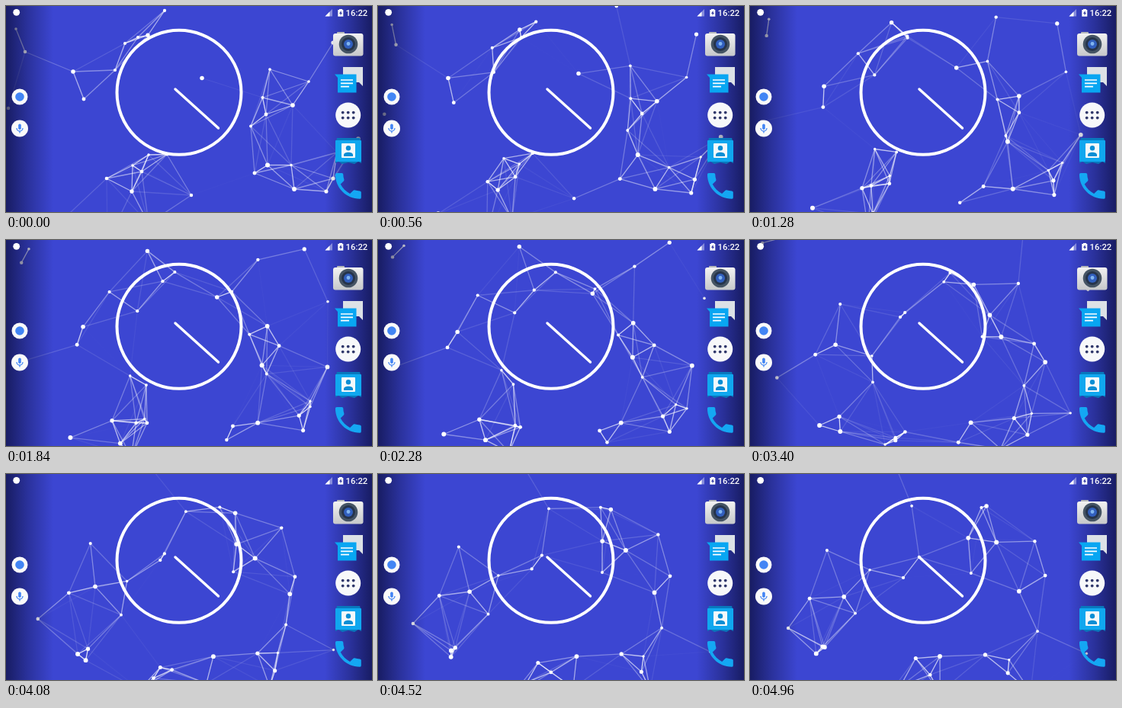
An HTML page with a canvas for the animation above (5000 ms loop, 480x270 px).

```html
<!DOCTYPE html>
<html lang="en">
<head>
<meta charset="utf-8">
<title>Particle wallpaper</title>
<style>
html, body { margin: 0; width: 100%; height: 100%; overflow: hidden; background: #3c46d2; }
canvas, svg { position: absolute; left: 0; top: 0; width: 480px; height: 270px; display: block; }
text { font: 500 11.3px Roboto, sans-serif; fill: #fff; }
</style>
</head>
<body>
<canvas id="net" width="480" height="270"></canvas>
<svg viewBox="0 0 480 270">
  <defs>
    <linearGradient id="shade">
      <stop offset="0" stop-color="#0a0c38" stop-opacity=".72"/>
      <stop offset=".45" stop-color="#0a0c38" stop-opacity=".36"/>
      <stop offset="1" stop-color="#0a0c38" stop-opacity="0"/>
    </linearGradient>
    <linearGradient id="metal" x2="0" y2="1">
      <stop offset="0" stop-color="#f2f2f2"/>
      <stop offset="1" stop-color="#c6c8ca"/>
    </linearGradient>
  </defs>

  <rect width="62" height="270" fill="url(#shade)"/>
  <rect width="62" height="270" fill="url(#shade)" transform="matrix(-1 0 0 1 480 0)"/>

  <g fill="none" stroke="#fff">
    <circle cx="227" cy="113.3" r="81.5" stroke-width="4"/>
    <path d="M222 109L278.5 160" stroke-width="3.4" stroke-linecap="round"/>
  </g>

  <!-- status bar -->
  <circle cx="13.7" cy="8.3" r="4.4" fill="#fff"/>
  <path d="M428 4V13.5H418.5Z" fill="#fff" opacity=".4"/>
  <path d="M424.5 7.5V13.5H418.5Z" fill="#fff"/>
  <path d="M437 4H441V5H442.3V13.7H435.3V5H437Z" fill="#fff"/>
  <path d="M439.5 6L437 10H438.6V12.5L441 8.7H439.5Z" fill="#3037a0"/>
  <text x="474.3" y="13" text-anchor="end">16:22</text>

  <!-- left dock -->
  <g fill="#fafafa">
    <circle cx="18" cy="119" r="10.5"/>
    <circle cx="18" cy="160.5" r="11"/>
  </g>
  <circle cx="18" cy="119" r="5.8" fill="#4285f4"/>
  <rect x="16.2" y="154.5" width="3.6" height="7.5" rx="1.8" fill="#4285f4"/>
  <path d="M14 160A4 4 0 0 0 22 160M18 164V166.5" fill="none" stroke="#4285f4" stroke-width="1.3"/>

  <!-- camera -->
  <rect x="434" y="34" width="10" height="5" rx="1" fill="#b5b8ba"/>
  <rect x="429" y="36" width="39.5" height="29.5" rx="3" fill="url(#metal)"/>
  <circle cx="449" cy="50" r="12.3" fill="#455464"/>
  <circle cx="449" cy="50" r="9" fill="#26344b"/>
  <circle cx="449" cy="50" r="6" fill="#315fbe"/>
  <circle cx="449" cy="49.5" r="2.4" fill="#82b6f0"/>

  <!-- messages -->
  <path d="M442 80H468V105L463 100H442Z" fill="#dce1e6"/>
  <path d="M431 89.5H459.5V113.5H435V94Z" fill="#08a6f2"/>
  <path d="M439 97H455M439 101.3H455M439 105.6H450" stroke="#fff" stroke-width="1.7"/>

  <!-- app drawer -->
  <circle cx="448.7" cy="143" r="16.5" fill="#f7f8fa"/>
  <g id="dots" fill="#30386b"></g>

  <!-- contacts -->
  <path d="M434 173H464L466 180V206L462 204L457 207L449 205L441 207L436 204L432 206V180Z" fill="#0878bd"/>
  <rect x="432" y="176" width="34" height="28" rx="1" fill="#10a7ef"/>
  <rect x="440" y="180" width="18" height="19" rx="1" fill="#f5f8fa"/>
  <circle cx="449" cy="186.3" r="3.2" fill="#0a8ed4"/>
  <path d="M443 197V195C443 190.5 455 190.5 455 195V197Z" fill="#0a8ed4"/>

  <!-- phone -->
  <path transform="translate(426.3 213.3) scale(1.88)" fill="#14a7f3" d="M6.6 10.8C8 13.6 10.4 16 13.2 17.4L15.4 15.2C15.7 14.9 16.1 14.8 16.4 14.9C17.5 15.3 18.8 15.5 20 15.5Q21 15.5 21 16.5V20Q21 21 20 21C10.6 21 3 13.4 3 4Q3 3 4 3H7.5Q8.5 3 8.5 4C8.5 5.2 8.7 6.4 9.1 7.6Q9.2 8.2 8.8 8.6Z"/>
</svg>
<script>
const LOOP = 5000, STEP = 40, REACH = 90;

// x, y, then speed in px/s; largest dots first
const dots = [
  [343, 208.5, -4, -24], [76.5, 278, 4.3, -10.3], [187, 285, -20.2, -10],
  [378, 240, -26, -.2], [462, 174, -22, -4.1], [376, 130, -18.1, -9.3],
  [88, 86, 7.1, 15.1], [257, 94.5, 10.7, -10.6], [186, 38.3, -.3, -13],
  [165, 243, -14.1, -3.4], [429, 48, -20.5, -19.6], [429, 226, -24.3, 2.2],
  [420, 243, -16.5, 3.6], [133, 309, 17, -13.6], [326, 219, -15.5, 13.6],
  [102, 122, -4.8, 8.3], [341, 142, 9.3, -1.8], [178, 217, 3.8, 12.4],
  [132, 226, 21, 7.5], [3, 134, 9.5, 13.7], [25, 60, -2.6, -16.5],
  [243, 248, 25.2, 7.6], [305, -11, 13.8, 20], [208, 6, -1.4, 26.2],
  [143, 84, 15.9, 5], [156, 49, -11.1, 10.3], [173, 41, 26.3, .6],
  [336.5, 120, -9.4, 2], [321, 157.5, 11.3, 9.8], [211, 194.5, -14.7, -2.4],
  [346, 83, -27, -8.3], [397, 99, 13.6, -9.9], [13, 30, 9.2, -9.9],
  [187, 195, -2.9, 21.5], [166, 209, -1.8, -16.8], [374, 208.5, 13.6, 5.4],
  [434, 192, -19, 10.4]
];

const ctx = document.getElementById("net").getContext("2d");

function draw(ms) {
  const t = ms / 1000;
  const pts = dots.map(([x, y, vx, vy]) => [x + vx * t, y + vy * t]);
  ctx.clearRect(0, 0, 480, 270);
  ctx.strokeStyle = ctx.fillStyle = "#fff";
  ctx.lineWidth = 1.3;
  pts.forEach(([x, y], i) => {
    for (const [u, v] of pts.slice(i + 1)) {
      const d = Math.hypot(x - u, y - v);
      if (d >= REACH) continue;
      ctx.globalAlpha = 1 - d / REACH;
      ctx.beginPath();
      ctx.moveTo(x, y);
      ctx.lineTo(u, v);
      ctx.stroke();
    }
  });
  ctx.globalAlpha = 1;
  pts.forEach(([x, y], i) => {
    ctx.beginPath();
    ctx.arc(x, y, 3 - 1.4 * i / dots.length, 0, 2 * Math.PI);
    ctx.fill();
  });
}

// app drawer grid
const grid = document.getElementById("dots");
for (let i = 0; i < 6; i++) {
  const c = document.createElementNS(grid.namespaceURI, "circle");
  c.setAttribute("cx", 441.7 + 7 * (i % 3));
  c.setAttribute("cy", i < 3 ? 139.6 : 146.6);
  c.setAttribute("r", 1.9);
  grid.append(c);
}

const start = performance.now();
function tick() {
  const ms = (performance.now() - start) % LOOP;
  draw(Math.floor(ms / STEP) * STEP);
  requestAnimationFrame(tick);
}
tick();
</script>
</body>
</html>
```
